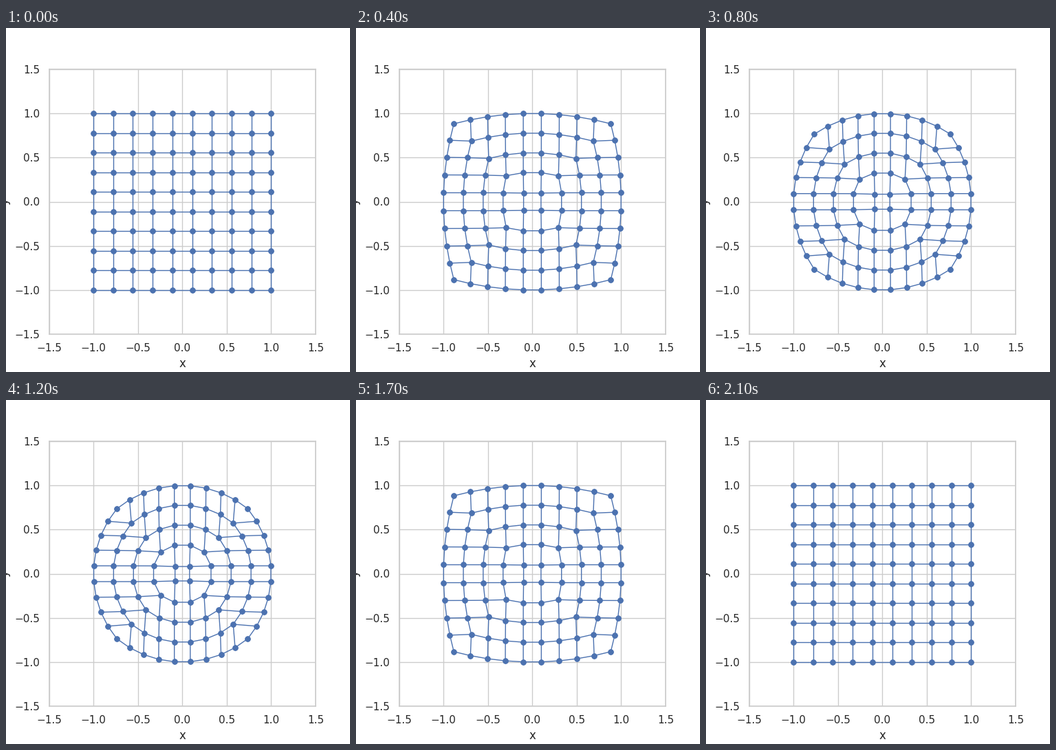
Animation of 500x500 px, one loop 2200 ms. Source, as a matplotlib script:

```python
import numpy as np
import matplotlib.pyplot as plt
from matplotlib.animation import FuncAnimation

N = 10        # grid points per side
STEPS = 10    # steps from square to disk
FRAMES = 2 * (STEPS + 1)

plt.rcParams.update({
    "font.family": "DejaVu Sans",
    "text.color": ".15",
    "axes.labelcolor": ".15",
    "axes.labelsize": 12,
    "axes.edgecolor": ".8",
    "axes.linewidth": 1.25,
    "axes.axisbelow": True,
    "axes.grid": True,
    "grid.color": ".8",
    "grid.linewidth": 1,
    "lines.solid_capstyle": "round",
})
for axis in ("xtick", "ytick"):
    plt.rcParams.update({
        f"{axis}.color": ".15",
        f"{axis}.labelsize": 11,
        f"{axis}.major.size": 6,
        f"{axis}.major.width": 1.25,
    })


def to_disk(x, y):
    """Concentric map: each square ring becomes a circle of the same radius."""
    wide = np.abs(x) > np.abs(y)
    r = np.where(wide, x, y)
    a = np.pi / 4 * np.where(wide, y, x) / r
    c, s = r * np.cos(a), r * np.sin(a)
    return np.where(wide, c, s), np.where(wide, s, c)


side = np.linspace(-1, 1, N)
square = np.array(np.meshgrid(side, side))
disk = np.array(to_disk(*square))

fig, ax = plt.subplots(figsize=(5, 5), dpi=100)
ax.set(xlim=(-1.5, 1.5), ylim=(-1.5, 1.5), xlabel="x", ylabel="y")
ticks = np.arange(-1.5, 1.6, 0.5)
ax.set_xticks(ticks)
ax.set_yticks(ticks)
ax.tick_params(bottom=False, left=False)

style = dict(color="#4c72b0", marker="o", lw=1, ms=5)
rows = [ax.plot([], [], **style)[0] for _ in range(N)]
cols = [ax.plot([], [], **style)[0] for _ in range(N)]


def update(i):
    t = min(i, FRAMES - 1 - i) / STEPS
    x, y = (1 - t) * square + t * disk
    for k in range(N):
        rows[k].set_data(x[k], y[k])
        cols[k].set_data(x[:, k], y[:, k])
    return rows + cols


anim = FuncAnimation(fig, update, frames=FRAMES, interval=100,
                     repeat=True, repeat_delay=0)
plt.show()
```
